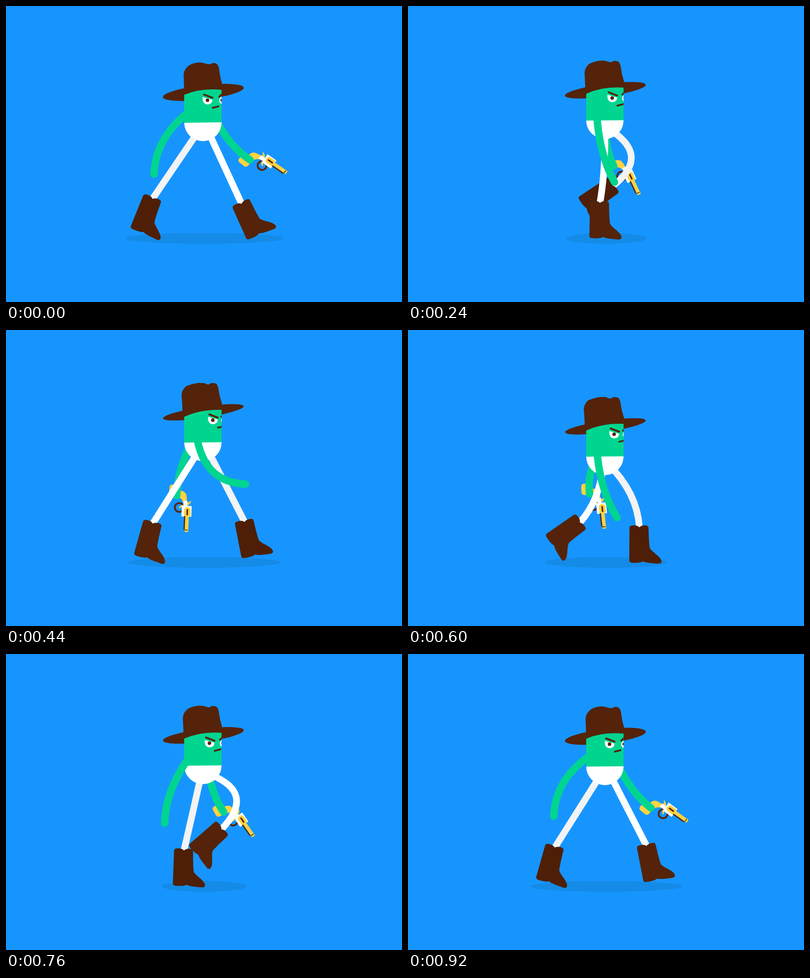
Write an HTML page that moves like this. It is 800 px wide and 600 px high and loops after 0.96 s.

```html
<!DOCTYPE html>
<html lang="en">
<head>
<meta charset="utf-8">
<title>Cowboy walk</title>
<style>
  html, body { margin: 0; width: 100%; height: 100%; overflow: hidden; background: #1795ff; }
  svg { display: block; width: 100%; height: 100%; }
  .leg, .arm, .line { fill: none; }
  .leg { stroke-width: 13.5; }
  .arm { stroke: #00d590; stroke-width: 15; stroke-linecap: round; }
  .line { stroke: #54230a; stroke-linecap: round; }
  .flat { stroke-linecap: butt; }
  .brown { fill: #54230a; }
  .yellow { fill: #ffd23f; }
  .white { fill: #fff; }
</style>
</head>
<body>
<svg viewBox="0 0 800 600">
  <defs>
    <path id="boot" d="M-20 2C-20-3-17-4-10-4C-5-4-2-2 0 0C2-2 5-4 10-4C16-4 18.5-3 18.5 2C19 15 19.5 30 21 41C23 49 45 59 45 69C45 74 39 73.5 34 73C24 72.5 14 72 8 69C4 71.5-4 72-10 72C-18 72-20 71-20 66Z"/>
    <clipPath id="head"><path d="M360 150H435.5V240H360Z"/></clipPath>
  </defs>

  <ellipse id="shadow" cx="400.5" cy="471" ry="11" fill="#148be6"/>

  <g id="gun">
    <circle class="line" cx="24" cy="-3" r="9" stroke-width="3.6"/>
    <path class="yellow" d="M20-10Q24-8 26-2L22-3Q20-6 18-9Z"/>
    <path class="yellow" d="M-22 8Q-22 3-17 3L-10 3Q-12-9-5-15Q4-19 13-17V-10Q4-8 2 4L1 13Q0 19-5 19L-18 18Q-22 17-22 13Z"/>
    <path class="yellow" d="M11-16Q15-20 9-27Q18-25 20-17Z"/>
    <path class="white" d="M10-19H20V-28H42V-8H20V-11H10Z"/>
    <path class="line flat" d="M40-14.5H68" stroke-width="2.4"/>
    <path class="yellow" d="M28-26H41V-23H73V-16H41V-13H28Q23-14 23-19Q23-25 28-26Z"/>
    <path class="line flat" d="M27-19.5H39" stroke-width="3"/>
    <path class="line flat" d="M69-22V-16" stroke-width="1.6"/>
  </g>
  <path id="farArm" class="arm"/>

  <path id="farLeg" class="leg" stroke="#f3f3f4"/>
  <use id="farBoot" href="#boot" fill="#4e1f06"/>

  <ellipse id="brim" class="brown" cx="398.7" cy="173.7" rx="82.3"/>
  <g id="body">
    <path fill="#00d590" d="M360 160H435.5V236H360Z"/>
    <path class="white" d="M360 235.2L435.5 234.4A37.75 37.75 0 0 1 360 235.2Z"/>
    <g clip-path="url(#head)">
      <g id="face">
        <path class="white" d="M397.3 183L417 188.5C417 194 413 198 407.2 198C401 198 396.6 193 397.3 183Z"/>
        <circle class="brown" cx="407" cy="189.6" r="3.6"/>
        <path class="line" d="M400 178L417 184.5" stroke-width="3.8"/>
        <path class="line" d="M417.5 205L429 202" stroke-width="3.6"/>
      </g>
      <g id="side">
        <ellipse class="white" cx="437.5" cy="190" rx="7" ry="7.5"/>
        <circle class="brown" cx="436" cy="189.5" r="3"/>
        <path class="line" d="M431 182.5L438 175.5" stroke-width="3.8"/>
      </g>
    </g>
    <path id="crown" class="brown"/>
  </g>

  <path id="nearLeg" class="leg" stroke="#fff"/>
  <use id="nearBoot" href="#boot" class="brown"/>
  <path id="nearArm" class="arm"/>
</svg>
<script>
const LOOP = 960, STEP = 40;
const $ = id => document.getElementById(id);
const set = (id, name, value) => $(id).setAttribute(name, value);

// Cosine that peaks at the given time, n times per loop
const wave = (t, peak, n = 1) => Math.cos(2 * Math.PI * n * (t - peak) / LOOP);

// Key poses of one step
const steps = [
  { t: 0,   x: 476, y: 401, turn: -24 }, // heel strike
  { t: 60,  x: 489, y: 400, turn: -4 },
  { t: 160, x: 444, y: 400, turn: 0 },   // flat
  { t: 300, x: 348, y: 398, turn: 3 },
  { t: 480, x: 296, y: 391, turn: 22 },  // push off
  { t: 640, x: 369, y: 387, turn: 61 },
  { t: 780, x: 444, y: 354, turn: 44 },  // highest lift
  { t: 920, x: 482, y: 389, turn: -11 }
];

// Smooth periodic curve through the key poses
function foot(time, part) {
  const n = steps.length, t = time % LOOP;
  const i = steps.findLastIndex(s => s.t <= t);
  const at = j => steps[(j + n) % n].t + Math.floor(j / n) * LOOP;
  const val = j => steps[(j + n) % n][part];
  const rate = j => (val(j + 1) - val(j)) / (at(j + 1) - at(j));
  const slope = j => {
    const before = at(j) - at(j - 1), after = at(j + 1) - at(j);
    return (rate(j - 1) * after + rate(j) * before) / (before + after);
  };
  const h = at(i + 1) - at(i), u = (t - at(i)) / h;
  const m0 = slope(i) * h, m1 = slope(i + 1) * h, d = val(i + 1) - val(i);
  return val(i) + u * (m0 + u * (3 * d - 2 * m0 - m1 + u * (m0 + m1 - 2 * d)));
}

// Limb from (x, y) to (x2, y2), bowed forward by b, or back if negative
function limb(x, y, x2, y2, b) {
  const dx = x2 - x, dy = y2 - y, len = Math.hypot(dx, dy);
  const handle = (f, k) => `${x + dx * f + dy / len * b * k} ${y + dy * f - dx / len * b * k}`;
  return `M${x} ${y}C${handle(1 / 3, 0.9)} ${handle(2 / 3, 1.1)} ${x2} ${y2}`;
}

// The knee takes up the slack, less so behind the hip
function drawLeg(side, t, dy) {
  const hipX = 399 + 8 * wave(t, -30), hipY = 249 + dy;
  const x = foot(t, 'x'), y = foot(t, 'y');
  const slack = Math.max(0, 164 - Math.hypot(x - hipX, y - hipY));
  const knee = 0.21 * slack ** 1.5 * Math.min(1, Math.max(0, 0.8 + (x - hipX) / 100));
  set(side + 'Leg', 'd', limb(hipX, hipY, x, y, knee));
  set(side + 'Boot', 'transform', `translate(${x} ${y}) rotate(${foot(t, 'turn')})`);
}

function drawNearArm(t, dy) {
  const deg = 2 + 43 * wave(t, 422) + 3 * wave(t, 440, 2);
  const a = deg * Math.PI / 180;
  const x = 380 + 140 * Math.sin(a), y = 225 + dy + 140 * Math.cos(a);
  set('nearArm', 'd', limb(379 + 8 * a, 216 + 11 * a + dy, x, y, -8 - 41 * a * a));
}

function drawGunArm(t, dy) {
  const s = wave(t, -5), x = 418 + 75 * s, y = 324 - 12 * s;
  set('farArm', 'd', limb(401 + 21 * s, 225 + dy, x, y, -10));
  set('gun', 'transform', `translate(${x + 3} ${y}) rotate(${64 - 29 * s})`);
}

function drawHat(turn, dy) {
  const l = -3 * turn, p = 7 * turn, low = 1.5 * turn;
  set('brim', 'ry', 14.5 - 3.5 * turn);
  set('brim', 'transform', `translate(0 ${dy}) rotate(${-6.7 - 2 * turn} 398.7 173.7)`);
  set('crown', 'transform', `rotate(${-2 * turn} 399 173.5)`);
  set('crown', 'd', `M360 ${178.5 + 2 * low}L${359.5 + l} 176Q${360 + l} 160 ${359 + l} 144
    C${358 + l} 133 ${361 + l} 126 ${369 + l} 119.5C${376 + p / 2} 115 ${384 + p} 113 ${391 + p} ${113 + low}
    C${399 + p / 2} 113 404 116.5 411 ${116.5 + low}C415 116 417 113.5 421 ${114 + low}
    C427 115 429.5 119 430.5 126Q432 142 437 158L436.5 ${168.5 + low}Q394 ${164 + 2 * low} 360 ${178.5 + 2 * low}Z`);
}

function draw(t) {
  const dy = 2 + 17 * wave(t, 110, 2) + 3 * wave(t, 105, 4);
  const turn = (1 - wave(t, 0)) / 2;
  set('shadow', 'rx', 121 + 40 * wave(t, 5, 2));
  set('body', 'transform', `translate(0 ${dy})`);
  set('face', 'transform', `translate(${11 * turn} 0)`);
  set('side', 'transform', `translate(${4 * turn} 0)`);
  drawHat(turn, dy);
  drawLeg('near', t, dy);
  drawLeg('far', t + LOOP / 2, dy);
  drawNearArm(t, dy);
  drawGunArm(t, dy);
}

const start = performance.now();
function tick() {
  const t = (performance.now() - start) % LOOP;
  draw(Math.floor(t / STEP) * STEP);
  requestAnimationFrame(tick);
}
tick();
</script>
</body>
</html>
```
